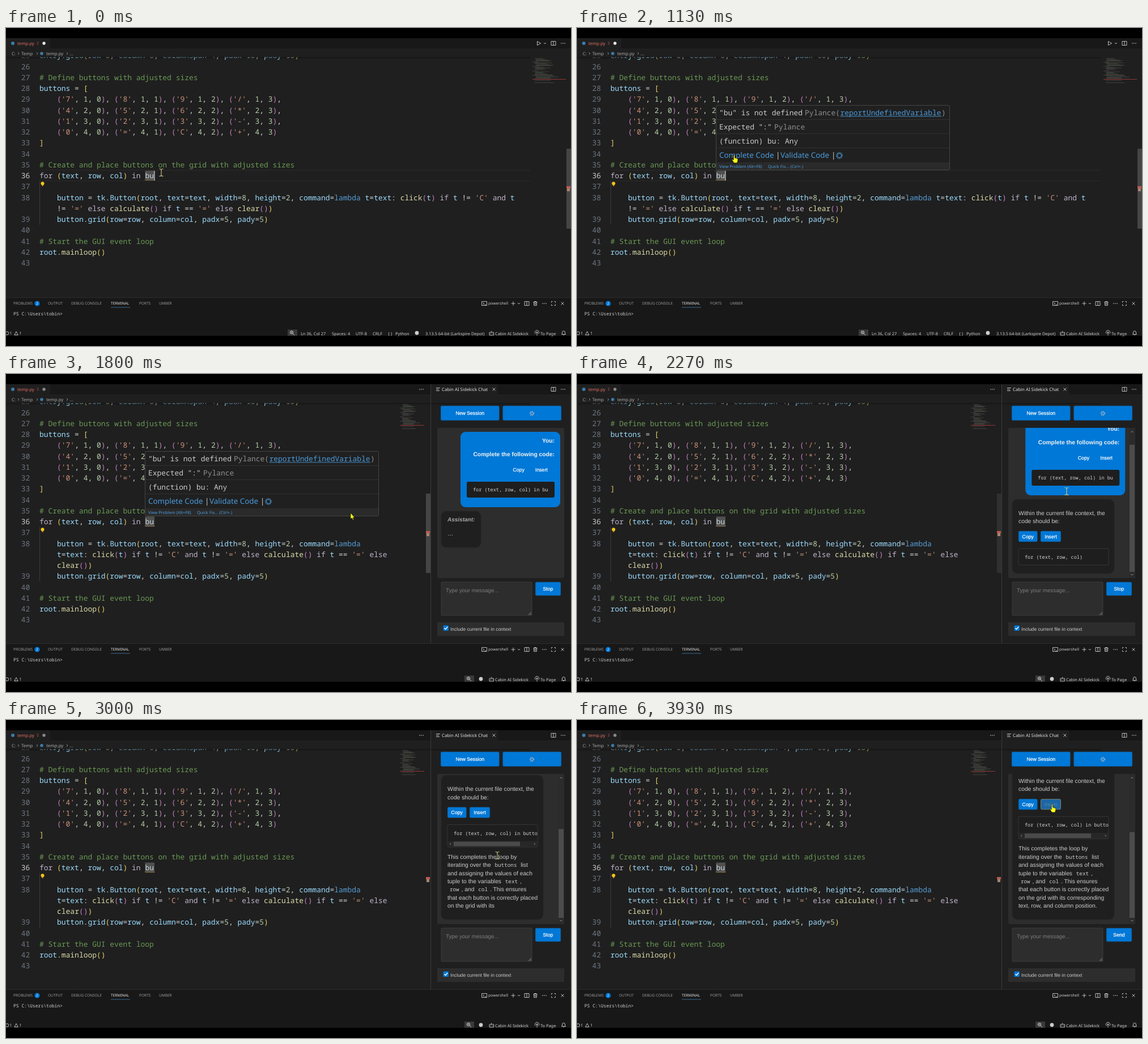
An HTML page for the animation above (4 s loop, 997x561 px).

```html
<!DOCTYPE html>
<html lang="en">
<head>
<meta charset="utf-8">
<title>Code editor with chat</title>
<style>
html, body { margin: 0; width: 100%; height: 100%; overflow: hidden; background: #000; }
svg { display: block; width: 997px; height: 561px; }
text { white-space: pre; text-rendering: geometricPrecision; font-family: "Noto Sans", "Open Sans", sans-serif; }
.mono { font-family: "Noto Sans Mono", "DejaVu Sans Mono", monospace; }
.arial { font-family: "Liberation Sans", Arial, sans-serif; }
.btn { font-family: "Liberation Sans", Arial, sans-serif; stroke: #fff; stroke-width: .25; }
.ic { font-family: "Noto Sans Mono", monospace; font-size: 9.3px; }
.line { fill: none; stroke: #ccc; stroke-width: .9; }
</style>
</head>
<body>
<svg id="stage" viewBox="0 0 997 561"></svg>
<script>
const LOOP = 4000, HOVER_IN = 560, HOVER_OUT = 1930, CHAT_IN = 1400;
const STREAM = 2015, WORD_MS = 18.8, SEND = 3290, PRESS = 3850, BAR_FADE = 2000;
const BLUE = '#0078d7', ROW = 19.26, TOP = 68;

// Vertical positions of text are line centres.
const tx = (x, y, s, size = 7.4, fill = '#ccc', cls = '', extra = '') =>
  `<text x="${x}" y="${y + size * .35}" font-size="${size}" fill="${fill}" class="${cls}" ${extra}>${s}</text>`;
const code = (x, y, s, fill = '#d4d4d4', size = 12.95) => tx(x, y, s, size, fill, 'mono');
const box = (x, y, w, h, fill, r = 0, extra = '') =>
  `<rect x="${x}" y="${y}" width="${w}" height="${h}" rx="${r}" fill="${fill}" ${extra}/>`;
const path = (d, extra = '') => `<path d="${d}" class="line" ${extra}/>`;
const disc = (x, y, r, fill) => `<circle cx="${x}" cy="${y}" r="${r}" fill="${fill}"/>`;
const g = (id, body, extra = '') => `<g id="${id}" ${extra}>${body}</g>`;
const button = (x, y, w, h, label, id = '') =>
  box(x + .3, y + .3, w - .6, h - .6, BLUE, 2, 'stroke="#14629f" stroke-width=".7"') +
  tx(x + w / 2, y + h / 2, label, 8.7, '#fff', 'btn', `text-anchor="middle" ${id && `id="${id}"`}`);
const dots = (x, y) => [-3, 0, 3].map(d => disc(x + d, y, .8, '#ccc')).join('');
const cross = (x, y) => path(`M${x - 2.5} ${y - 2.5}l5 5m0 -5l-5 5`);
const chevron = (x, y) => path(`M${x - 2} ${y - 1}l2 2l2 -2`);
const split = (x, y) => path(`M${x - 4} ${y - 3.5}h8v7h-8zm4 0v7`);
const gear = (x, y, color, r = 4) =>
  `<circle cx="${x}" cy="${y}" r="${r}" fill="none" stroke="${color}" stroke-width="1.6" stroke-dasharray="1.7 1.4"/>
   <circle cx="${x}" cy="${y}" r="${r - 1.4}" fill="none" stroke="${color}" stroke-width=".9"/>`;

const BRACKETS = ['#ead069', '#c77fc6', '#4fa3e8'];
let depth = 0;
function paint(s) {
  const span = (c, v) => `<tspan fill="${c}">${v}</tspan>`;
  return s.replace(/#.*|'[^']*'|[A-Za-z_]\w*\(?|\d+|[()[\]]/g, m => {
    if (m[0] === '#') return span('#6a9955', m);
    if (m[0] === "'") return span('#ce9178', m);
    if (/^\d/.test(m)) return span('#b5cea8', m);
    if (/^[([]$/.test(m)) return span(BRACKETS[depth++ % 3], m);
    if (/^[)\]]$/.test(m)) return span(BRACKETS[--depth % 3], m);
    const name = m.replace('(', '');
    const call = name !== m;
    const color = /^(for|in|if|else|and)$/.test(name) ? '#c0b4cc'
      : name === 'lambda' ? '#569cd6'
      : name === 'bu' ? '#c8d4dc'
      : call && !/^(Button|grid)$/.test(name) ? '#dcdcaa' : '#9cdcfe';
    return span(color, name) + (call ? span(BRACKETS[depth++ % 3], '(') : '');
  });
}

const HEAD = `25|entry.grid(row=0, column=0, columnspan=4, padx=10, pady=10)
26|
27|# Define buttons with adjusted sizes
28|buttons = [
29|    ('7', 1, 0), ('8', 1, 1), ('9', 1, 2), ('/', 1, 3),
30|    ('4', 2, 0), ('5', 2, 1), ('6', 2, 2), ('*', 2, 3),
31|    ('1', 3, 0), ('2', 3, 1), ('3', 3, 2), ('-', 3, 3),
32|    ('0', 4, 0), ('=', 4, 1), ('C', 4, 2), ('+', 4, 3)
33|]
34|
35|# Create and place buttons on the grid with adjusted sizes
36|for (text, row, col) in bu
37|`.split('\n');
const BODY_WIDE = `38|    button = tk.Button(root, text=text, width=8, height=2, command=lambda t=text: click(t) if t != 'C' and t
|    != '=' else calculate() if t == '=' else clear())`.split('\n');
const BODY_NARROW = `38|    button = tk.Button(root, text=text, width=8, height=2, command=lambda
|    t=text: click(t) if t != 'C' and t != '=' else calculate() if t == '=' else
|    clear())`.split('\n');
const TAIL = `39|    button.grid(row=row, column=col, padx=5, pady=5)
40|
41|# Start the GUI event loop
42|root.mainloop()
43|`.split('\n');

function lines(list, first) {
  return list.map((l, i) => {
    const [no, s] = l.split('|'), y = TOP + ROW * (first + i);
    const indent = s.length - s.trimStart().length;
    return tx(42.3, y, no, 12.95, no === '36' ? '#ccc' : '#6e7681', 'mono', 'text-anchor="end"') +
      code(59 + indent * 7.77, y, paint(s.trim()));
  }).join('');
}

function minimap(x, w) {
  let seed = 7, out = '';
  const rnd = () => (seed = seed * 16807 % 2147483647) / 2147483647;
  const tints = ['#5c6b73', '#4d6645', '#6d6d6d', '#75604f'];
  for (let i = 0; i < 36; i++) {
    if (rnd() < .2) continue;
    const dense = i > 23, pad = i % 6 ? 3 + rnd() * 4 : 0;
    out += box(x + pad, 52 + i * 1.3, (dense ? .35 + rnd() * .35 : .15 + rnd() * .4) * w, .8, tints[i % 4], 0, 'opacity=".55"');
  }
  return out + box(x, 90, w, 1, '#923636');
}

const editorSide = (right, mapX, mapW, barY, bar, markY, id) =>
  minimap(mapX, mapW) + g(id, box(right - 8, barY, 8, bar, '#454545')) +
  box(right - 8, markY, 7, 4, '#b85a55') + box(right - 7, markY + 4, 5, 5, '#a98270');
const zoom = x => box(x - 8, 532, 17, 11, '#3a3a3a') +
  `<circle cx="${x - 1}" cy="537" r="2.7" class="line"/>` + path(`M${x + 1} 539l3 3M${x - 2.5} 537h3m-1.5 -1.5v3`);

const frame = box(0, 18, 997, 525, '#1f1f1f') + box(78, 18, 919, 18, '#181818') +
  disc(12, 27, 3, '#3b7cab') + tx(20, 27, 'temp.py', 7.8, '#e06c62') + tx(54, 27, '2', 7, '#b8564e') +
  tx(10, 45, 'C:', 7.6, '#a9a9a9') + tx(27, 45, 'Temp', 7.8, '#a9a9a9') + disc(63, 45, 2.8, '#3b7cab') +
  tx(71, 45, 'temp.py', 7.9, '#a9a9a9') + tx(112, 45, '...', 7.8, '#a9a9a9') +
  [21, 54, 107].map(x => path(`M${x} 43l2 2l-2 2`, 'opacity=".7"')).join('');

const panel = box(0, 475, 997, 68, '#181818') + box(0, 475, 997, 1, '#2b2b2b') +
  [[13, 'PROBLEMS'], [74, 'OUTPUT'], [115, 'DEBUG CONSOLE'], [185, 'TERMINAL'], [235, 'PORTS'], [270, 'UMBER']]
    .map(([x, s]) => tx(x, 486, s, 6.55, s === 'TERMINAL' ? '#e7e7e7' : '#9d9d9d')).join('') +
  box(185, 492.5, 34, .8, '#3f7fb0') + disc(55, 486, 4.6, BLUE) + tx(55, 486, '2', 6, '#fff', '', 'text-anchor="middle"') +
  code(13, 504.5, 'PS C:\\Users\\tobin&gt;', '#d0d0d0', 8.07) +
  path('M839.5 482.5h9v7h-9zM841.5 484.5l2 1.7l-2 1.7m3 .3h2.5') + tx(851, 486, 'powershell', 6.8) +
  path('M891.5 486h7m-3.5 -3.5v7') + chevron(905, 486) + split(919, 486) +
  path('M930.5 483.5h7m-5 0v-1h3v1m-4.2 0l.4 6h4.6l.4 -6m-3.5 1.5v3m1.6 -3v3') + dots(950, 486) +
  path('M962.5 484.5v-2h2m3 0h2v2m0 3v2h-2m-3 0h-2v-2') + cross(982, 486) +
  `<circle cx="2" cy="538.5" r="2.8" class="line"/>` + tx(6.5, 538.5, '1', 7.2) +
  path('M18 535.5l3.2 6h-6.4z') + tx(23.5, 538.5, '1', 7.2) +
  path('M853 537h7.5v5h-7.5zm3.7 0v-2.5m-1.7 4.5v1m3.4 -1v1') + tx(863, 539, 'Cabin AI Sidekick') +
  disc(937, 537, 1.3, '#ccc') + path('M934.5 539.5a3.6 3.6 0 1 1 5 0M937 538v4.5') + tx(943, 539, 'To Page') +
  path('M980.5 540.5h7l-1 -1.5v-2a2.5 2.5 0 0 0 -5 0v2zm2.7 1.2h1.6');

const wide = lines(BODY_WIDE, 12) + lines(TAIL, 14) +
  box(59, 270, 1, 77, '#3c3c3c') + box(59, 250.5, 866, 1, '#2c2c2c') + box(59, 269.3, 866, 1, '#2c2c2c') +
  editorSide(997, 929, 59, 213, 141, 279, 'wideBar') + disc(67, 27, 2.7, '#e8e8e8') +
  path('M937.5 23.5l6 3.5l-6 3.5z') + chevron(951, 27) + split(966, 27) + dots(983, 27) +
  zoom(505) + disc(725, 538, 3.4, '#ccc') +
  [[520, 'Ln 36, Col 27'], [575, 'Spaces: 4'], [617, 'UTF-8'], [647, 'CRLF'], [674, '{ }'], [687, 'Python'],
   [740, '3.13.5 64-bit (Larkspire Depot)']].map(([x, s]) => tx(x, 539, s)).join('');

const narrow = lines(BODY_NARROW, 12) + lines(TAIL, 15) + box(59, 270, 1, 96, '#3c3c3c') +
  editorSide(749, 695, 43, 211, 140, 277, 'narrowBar') + disc(67, 27, 2.7, '#8a8a8a') + dots(733, 27) +
  box(749, 18, 1, 457, '#3a3a3a') + box(750, 18, 118, 18, '#1f1f1f') +
  path('M759 24.5h7m-7 2.5h5m-5 2.5h6') + tx(769, 27, 'Cabin AI Sidekick Chat', 7.8, '#e0e0e0') +
  cross(861, 27) + split(966, 27) + dots(983, 27) + zoom(817) + disc(838, 538, 3.4, '#ccc') +
  button(767, 56, 103.5, 26, 'New Session') + button(876.5, 56, 103.5, 26, '') + gear(928, 69.5, '#9fb4c6', 3.4) +
  box(761, 95, 224, 265, '#2d2d2d', 3) +
  box(768, 367, 160, 59, '#2d2d2d', 1, 'stroke="#3f3f3f" stroke-width=".8"') +
  tx(776, 381.5, 'Type your message...', 9.8, '#7d7d7d', 'arial') + path('M922 425l5 -5m-2 5l2 -2', 'opacity=".7"') +
  button(934, 367, 45, 24, 'Stop', 'send') +
  box(761, 438, 224, 24, '#2d2d2d') + box(771.5, 443.5, 9.5, 9.5, BLUE, 1.5) +
  path('M773.5 448.3l2 2.2l3.7 -4.5', 'style="stroke:#fff;stroke-width:1.4"') +
  tx(784, 450, 'Include current file in context', 8.45, '#ccc', 'arial');

const question = box(802, 102, 176, 133, BLUE, 9) +
  tx(968, 117, 'You:', 10.3, '#f2f2f2', 'arial', 'text-anchor="end" font-weight="bold"') +
  tx(968, 141, 'Complete the following code:', 10.3, '#f2f2f2', 'arial', 'text-anchor="end" font-weight="bold"') +
  tx(894.5, 169, 'Copy', 8.7, '#fff', 'btn') + tx(934, 169, 'Insert', 8.7, '#fff', 'btn') +
  box(813, 190, 155, 28, '#1e1e1e', 3) + code(824, 204, 'for (text, row, col) in bu', '#d4d4d4', 8.5);

const hover = box(245.5, 136.5, 412, 114, '#202020', 2, 'stroke="#454545"') +
  code(251, 149, '"bu" is not defined', '#ccc', 12.9) + code(402, 149, 'Pylance(', '#8f8f8f', 12.9) +
  code(464.5, 149, 'reportUndefinedVariable', '#4a9bdc', 12.9) + box(464.5, 155.5, 178.5, .9, '#4a9bdc') +
  code(643, 149, ')', '#8f8f8f', 12.9) +
  code(251, 174, 'Expected ":"', '#ccc', 12.9) + code(348, 174, 'Pylance', '#8f8f8f', 12.9) +
  [161, 186, 211].map(y => box(246, y, 411, .8, '#363636')).join('') +
  code(251, 199, '(function) bu: Any', '#ccc', 12.9) +
  tx(251, 224.5, 'Complete Code', 13.4, '#4a9bdc') + tx(351, 224.5, '|', 13.4) +
  tx(359, 224.5, 'Validate Code', 13.4, '#4a9bdc') + tx(449, 224.5, '|', 13.4) + gear(463, 225, '#4a9bdc', 5) +
  box(246, 237, 411, 13, '#2a2a2a') +
  tx(251, 244, 'View Problem (Alt+F8)', 7.42, '#4a9bdc') + tx(337, 244, 'Quick Fix... (Ctrl+.)', 7.42, '#4a9bdc');

const pointers =
  g('beam', path('M-3.5 -6.5q3 0 3.5 1.5q.5 -1.5 3.5 -1.5M-3.5 6.5q3 0 3.5 -1.5q.5 1.5 3.5 1.5M0 -5v10', 'style="stroke:#cfc78e;stroke-width:1.1"')) +
  g('arrow', '<path d="M-3 -6V5L-.6 2.8L1 6.3L2.7 5.5L1.2 2.2H4.2Z" fill="#ffff1a" stroke="#111" stroke-width=".7"/>') +
  g('hand', '<path d="M-2 7L-5.5 1.5Q-5 -.3 -2.8 2V-6Q-1.7 -7.8 -.6 -6V-2L3.8 -.8Q5.4 0 4.9 2.5L3.6 7Z" fill="#ffff1a" stroke="#111" stroke-width=".7"/>');

const codeHead = `<clipPath id="editClip"><rect x="0" y="51" width="997" height="424"/></clipPath>` +
  box(245.5, 251.5, 16.5, 17.5, '#505050') + g('', lines(HEAD, -1), 'clip-path="url(#editClip)"') +
  box(0, 51, 925, 2.5, '#111', 0, 'opacity=".45"') +
  path('M245 268.5q1 -2 2 0' + 't2 0'.repeat(7), 'style="stroke:#a98a45;stroke-width:.8"') +
  path('M260.5 268.5q1 -2 2 0', 'style="stroke:#d05a50"') +
  disc(64.5, 274.3, 3, '#f5c518') + box(63.3, 277, 2.4, 2, '#b8932a', .6);

const stage = document.getElementById('stage');
stage.innerHTML = `<clipPath id="chatClip"><rect x="761" y="95" width="224" height="265"/></clipPath>
  <clipPath id="codeClip"><rect x="779" y="0" width="159" height="561"/></clipPath>` +
  frame + panel + codeHead + g('wide', wide) +
  g('narrow', narrow + g('', g('question', question) + g('answer', ''), 'clip-path="url(#chatClip)"')) +
  box(261.3, 252, 1.2, 17, '#d8d8d8', 0, 'id="caret"') + g('hover', hover) + g('pointer', pointers);

const $ = id => document.getElementById(id);
const show = (id, on) => { $(id).style.display = on ? '' : 'none'; };

const INTRO = ['Within the current file context, the', 'code should be:'];
const SNIPPET = ['for (text, row, col) in buttons:'];
const PARA = ['This completes the loop by', 'iterating over the `buttons` list',
  'and assigning the values of each', 'tuple to the variables `text`,',
  '`row`, and `col`. This ensures', 'that each button is correctly placed',
  'on the grid with its corresponding', 'text, row, and column position.'];
const take = (list, n) => list.map(l => {
  const words = l.split(' '), part = words.slice(0, Math.max(0, n)).join(' ');
  n -= words.length;
  return part;
}).filter(Boolean);
const rich = s => s.replace(/`(\w+)`(.?)/g, '<tspan dx="3.9" class="ic">$1</tspan><tspan dx="3.9">$2</tspan>');
const prose = (x, y, s) => tx(x, y, rich(s), 10.3, '#ccc', 'arial');
const card = (y, w, h) => box(768, y, w, h, '#1f1f1f', 9, 'stroke="#252525"');

function answer(n, pressed) {
  if (n < 1) {
    $('question').removeAttribute('transform');
    return card(242, 70, 64) + tx(779, 256, 'Assistant:', 10, '#a8a8a8', 'arial', 'font-weight="bold" font-style="italic"') +
      tx(779, 281, '...', 12, '#a8a8a8', 'arial');
  }
  const intro = take(INTRO, n), snippet = take(SNIPPET, n - 9), para = take(PARA, n - 15);
  const scrolls = n >= 15, hasCode = snippet.length > 0;
  const height = para.length ? 168 + 14.4 * (para.length - 1)
    : hasCode ? (scrolls ? 142 : 131) : 48 + 14.4 * (intro.length - 1);
  const top = Math.min(242, 352 - height), over = 242 - top;
  $('question').setAttribute('transform', `translate(${over ? -10.7 : 0} ${-over})`);
  let out = card(top, 180, height) + intro.map((s, i) => prose(779, top + 24 + 14.4 * i, s)).join('');
  if (hasCode) {
    const y = top + 87;
    out += button(779, top + 56, 33.5, 19, 'Copy') +
      (pressed
        ? box(818.5, top + 56.5, 35, 18, '#1c66a5', 2, 'stroke="#8b8f78" stroke-width=".8"') + tx(836, top + 65.5, 'Insert', 8.7, '#5b86a6', 'arial', 'text-anchor="middle"')
        : button(818, top + 56, 36, 19, 'Insert')) +
      box(779, y, 159, scrolls ? 39.5 : 29, '#1e1e1e', 2, 'stroke="#393939" stroke-width=".9"') +
      g('', code(790, y + 15, snippet[0], '#d4d4d4', 8.5), 'clip-path="url(#codeClip)"');
    if (scrolls) out += box(779.5, y + 29, 158, 10, '#272727') + box(790, y + 30, 117, 8, '#4a4a4a') +
      path(`M785 ${y + 32.5}l-1.5 1.5l1.5 1.5M932 ${y + 32.5}l1.5 1.5l-1.5 1.5`, 'opacity=".7"');
  }
  out += para.map((s, i) => prose(779, top + 143.5 + 14.4 * i, s)).join('');
  if (over) {
    const thumb = 242 * 265 / (265 + over);
    out += box(974, 95, 11, 265, '#2b2b2b') + box(975, 349 - thumb, 9, thumb, '#4c4c4c') +
      path('M977.5 103l2 -2l2 2M977.5 353l2 2l2 -2', 'opacity=".7"');
  }
  return out;
}

// time, x, y, shape
const MOVES = [
  [0, 274, 255, 'beam'], [280, 258, 260, 'beam'], [640, 258, 260, 'beam'], [800, 268, 244, 'arrow'],
  [950, 278, 232, 'hand'], [1130, 279, 231, 'hand'], [1420, 279, 231, 'hand'], [1500, 320, 237, 'arrow'],
  [1800, 611, 251, 'arrow'], [2060, 800, 226, 'arrow'], [2200, 864, 207, 'beam'], [2300, 864, 207, 'beam'],
  [2560, 871, 258, 'arrow'], [2700, 871, 258, 'arrow'], [2930, 867, 239, 'beam'], [3250, 867, 239, 'beam'],
  [3640, 842, 160, 'hand'], [3780, 840, 156, 'hand'], [4000, 840, 156, 'hand']];

function movePointer(t) {
  const i = Math.max(0, MOVES.findIndex(m => m[0] > t) - 1);
  const [t0, x0, y0, shape] = MOVES[i], [t1, x1, y1] = MOVES[i + 1];
  const p = (t - t0) / (t1 - t0), e = p * p * (3 - 2 * p);
  $('pointer').setAttribute('transform', `translate(${x0 + (x1 - x0) * e} ${y0 + (y1 - y0) * e})`);
  for (const s of ['beam', 'arrow', 'hand']) show(s, s === shape);
}

let last = '';
function render(t) {
  const chat = t >= CHAT_IN;
  show('wide', !chat);
  show('narrow', chat);
  show('caret', !chat && t % 1000 < 500);
  show('hover', t >= HOVER_IN && t < HOVER_OUT);
  $('narrowBar').style.opacity = Math.max(0, Math.min(1, 1 - (t - BAR_FADE) / 500));
  $('send').textContent = t < SEND ? 'Stop' : 'Send';
  const n = Math.max(0, Math.min(58, Math.floor((t - STREAM) / WORD_MS))), pressed = t >= PRESS;
  if (last !== n + '/' + pressed) {
    last = n + '/' + pressed;
    $('answer').innerHTML = answer(n, pressed);
  }
  movePointer(t);
}

const start = performance.now();
function tick() {
  render((performance.now() - start) % LOOP);
  requestAnimationFrame(tick);
}
tick();
</script>
</body>
</html>
```
